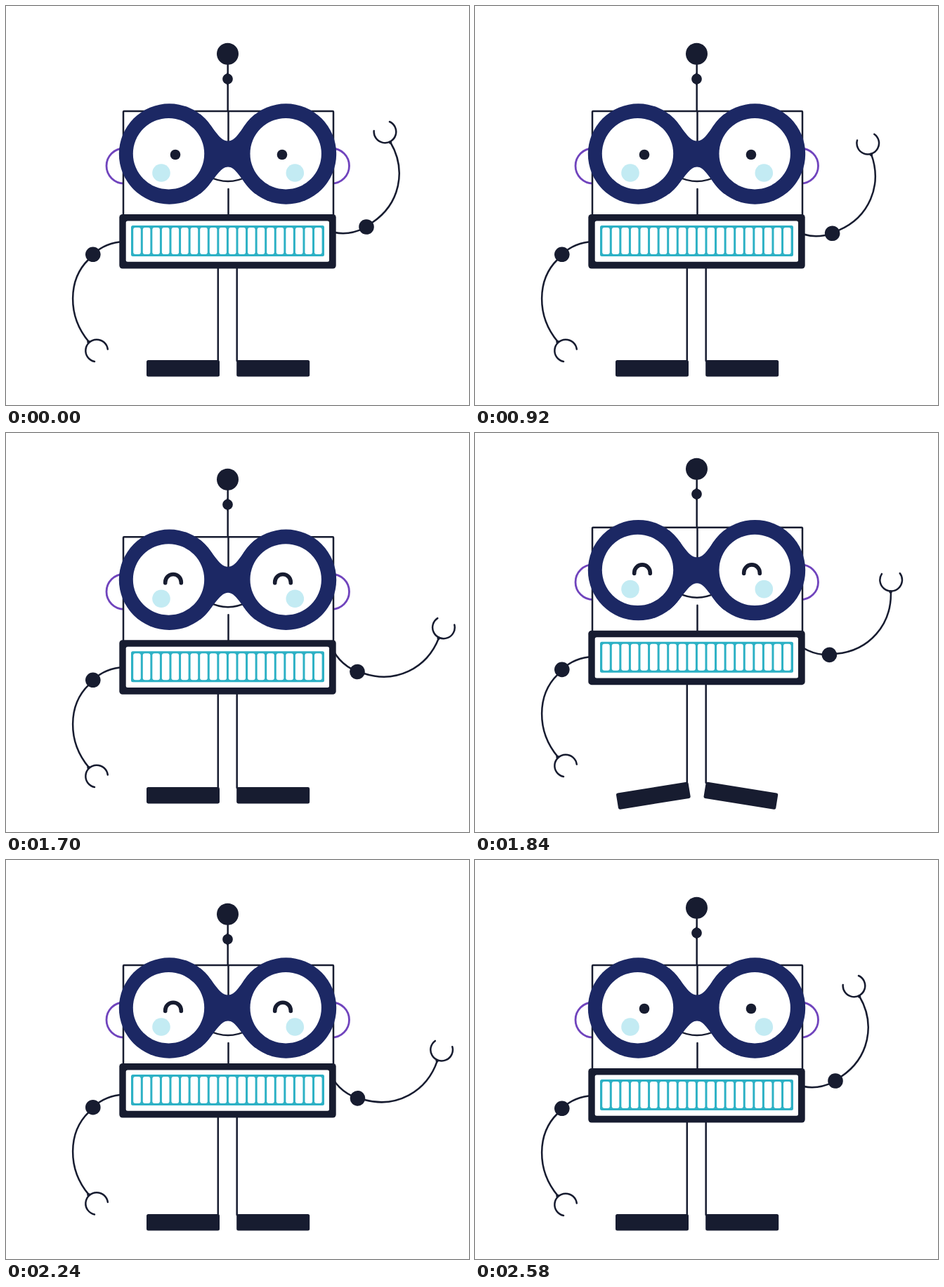
Write an HTML page that moves like this. It is 659 px wide and 569 px high and loops after 2.6 s.

```html
<!DOCTYPE html>
<html lang="en">
<head>
<meta charset="utf-8">
<title>Waving robot</title>
<style>
  html, body { margin: 0; width: 100%; height: 100%; overflow: hidden; background: #fff; }
  svg { display: block; width: 100%; height: 100%; }
  .line { fill: none; stroke: #171c30; stroke-width: 2.5; stroke-linecap: round; }
  .dark { fill: #171c30; }
  .navy { fill: #1c2864; }
  .ear { fill: #fff; stroke: #7044bd; stroke-width: 2.8; }
  .cheek { fill: #c3ebf3; }
  .cyan { fill: #2db1c5; }
  .white { fill: #fff; }
  .smile { fill: none; stroke: #171c30; stroke-width: 5.6; stroke-linecap: round; }
</style>
</head>
<body>
<svg viewBox="0 0 659 569">
  <g id="antenna">
    <path class="line" d="M315.7 68V150"/>
    <path class="dark" d="M315.5 94L322 103.5L315.5 114L309 103.5Z"/>
    <circle class="dark" cx="315.5" cy="104" r="7.4"/>
    <circle class="dark" cx="315.5" cy="68.2" r="15.5"/>
  </g>

  <g id="head">
    <circle class="ear" cx="168" cy="228" r="25"/>
    <circle class="ear" cx="463.5" cy="228" r="25"/>
    <rect class="line" x="167" y="150" width="299" height="160" rx="1" style="fill:#fff"/>
    <path class="line" d="M316.5 150V215M316.5 261V310M288 243Q316 257 344 243"/>
    <g class="navy">
      <circle cx="232.5" cy="211" r="71.7"/>
      <circle cx="398.5" cy="211" r="71.7"/>
      <path d="M276 154C294 168 302 192.5 316 192.5S337 168 355 154V268C337 254 329 229.5 316 229.5S294 254 276 268Z"/>
    </g>
    <circle class="white" cx="231.5" cy="210.7" r="50.7"/>
    <circle class="white" cx="398.2" cy="210.7" r="50.7"/>
    <circle class="cheek" cx="221" cy="238" r="12.8"/>
    <circle class="cheek" cx="411.3" cy="238" r="12.8"/>
    <g id="open" class="dark">
      <ellipse class="pupil" cx="241" cy="212" rx="7.3" ry="7.3"/>
      <ellipse class="pupil" cx="393" cy="212" rx="7.3" ry="7.3"/>
    </g>
    <path id="happy" class="smile" d="M226.7 215.5V214.5A11.3 11.3 0 0 1 249.3 214.5V215.5M382.7 215.5V214.5A11.3 11.3 0 0 1 405.3 214.5V215.5"/>
  </g>

  <g id="armL">
    <path class="line" d="M168 336Q142 337 124 354M118 361C88 390 87 442 118 479M144.8 489.5A15.8 15.8 0 1 0 126 507"/>
    <circle class="dark" cx="123.8" cy="354.3" r="10.8"/>
    <circle class="dark" cx="117.5" cy="479" r="2.3"/>
  </g>

  <!-- elbow at the origin -->
  <g id="armR">
    <path class="line" d="M-58 4Q-29 16 0 0M8 -6C47 -32 58 -80 34 -121M33 -150A15.8 15.8 0 1 1 10.7 -137"/>
    <circle class="dark" r="10.8"/>
    <circle class="dark" cx="34" cy="-120.5" r="2.3"/>
  </g>

  <path id="legs" class="line"/>
  <rect id="footL" class="dark" x="200" y="505" width="104" height="23.5" rx="2.5"/>
  <rect id="footR" class="dark" x="328.2" y="505" width="104" height="23.5" rx="2.5"/>

  <g id="panel">
    <rect class="dark" x="161.3" y="297" width="308.4" height="77.5" rx="4.5"/>
    <rect class="white" x="170.7" y="306.5" width="289.3" height="58.3" rx="2.5"/>
    <rect class="cyan" x="178" y="313" width="275" height="44" rx="2.5"/>
    <g id="bars" class="white"></g>
  </g>
</svg>

<script>
  const LOOP = 2600;
  const $ = id => document.getElementById(id);
  const pupils = document.querySelectorAll('.pupil');
  const set = (id, value) => $(id).setAttribute('transform', value);
  const ramp = (t, a, b) => Math.min(1, Math.max(0, (t - a) / (b - a)));
  const swell = x => Math.sin(x * Math.PI / 2) ** 2;
  const bump = (t, a, b) => Math.sin(Math.PI * ramp(t, a, b));

  for (let i = 0; i < 20; i++) {
    const bar = document.createElementNS('http://www.w3.org/2000/svg', 'rect');
    const box = { x: 181.2 + i * 13.57, y: 316, width: 10.6, height: 38, rx: 3 };
    for (const k in box) bar.setAttribute(k, box[k]);
    $('bars').append(bar);
  }

  // eased take-off, then a fall under gravity
  const hop = (t, start, top, land) =>
    swell(ramp(t, start, top)) * (1 - ramp(t, top, land) ** 2);

  function draw(t) {
    const rise = -27 * hop(t, 1640, 2010, 2210);
    const limbRise = -27 * hop(t, 1640, 1985, 2200);
    const recoil = bump(t, 2195, 2330);

    const headY = rise;
    const panelY = rise - 8 * recoil;
    const armY = limbRise - 1.8 * recoil;
    const antennaY = limbRise + 10.3 * recoil;

    const sway = -17.3 * swell(2 * ramp(t, 0, 840));
    set('antenna', `translate(0 ${antennaY}) rotate(${sway} 316 150)`);
    set('head', `translate(0 ${headY})`);
    set('panel', `translate(0 ${panelY})`);
    set('armL', `translate(0 ${armY})`);

    // three waves; the elbow leads the forearm
    const wave = swell(6 * ramp(t, 835, 2575));
    const lead = wave ** 0.68;
    set('armR', `translate(${513 - 13 * lead} ${315 + 27.5 * lead + armY}) rotate(${51.8 * wave})`);

    const kick = hop(t, 1690, 2010, 2210);
    const lift = -16 * kick, tilt = 20 * kick, spread = 1.5 * kick;
    set('footL', `translate(${-spread} ${lift}) rotate(${-tilt} 302 505)`);
    set('footR', `translate(${spread} ${lift}) rotate(${tilt} 330 505)`);
    const hip = 360 + panelY, ankle = 506 + lift;
    $('legs').setAttribute('d', `M301.8 ${hip}V${ankle}M328.7 ${hip}V${ankle}`);

    const happy = t >= 1640 && t < 2420;
    $('happy').style.display = happy ? '' : 'none';
    $('open').style.display = happy ? 'none' : '';
    const blink = 0.9 * swell(2 * ramp(t, 380, 550));
    pupils.forEach(p => p.setAttribute('ry', 7.3 * (1 - blink)));
  }

  function tick() {
    draw(performance.now() % LOOP);
    requestAnimationFrame(tick);
  }
  tick();
</script>
</body>
</html>
```
